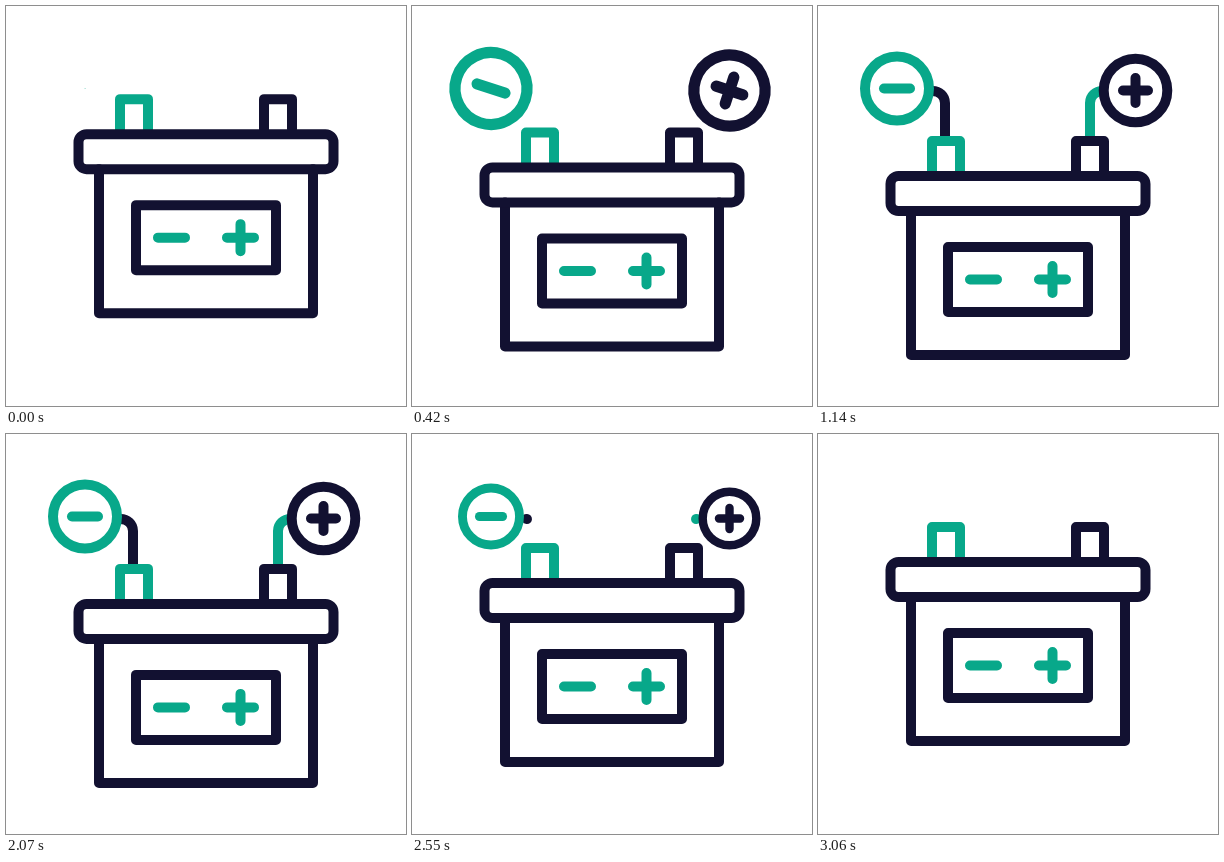
These frames come from a looping animation (400x400 px, 5.09 s). An HTML page:

```html
<!DOCTYPE html>
<html lang="en">
<head>
<meta charset="utf-8">
<title>Car battery</title>
<style>
  html, body { margin: 0; width: 100%; height: 100%; overflow: hidden; background: #fff; }
  svg { display: block; width: 100%; height: 100%; }
  .line { fill: none; stroke-width: 10; stroke-linecap: round; stroke-linejoin: round; }
  .dark { stroke: #121131; }
  .green { stroke: #08a88a; }
</style>
</head>
<body>
<svg viewBox="0 0 400 400" class="line">
  <path id="wireLeft" class="dark" pathLength="1" d="M114.5 85c7 0 12.5 5 12.5 12V131"/>
  <path id="wireRight" class="green" pathLength="1" d="M284.5 85c-7 0-12.5 5-12.5 12V131"/>
  <g id="battery">
    <path class="green" d="M114 123V93H142V123"/>
    <path class="dark" d="M258 123V93H286V123"/>
    <path class="dark" d="M93 163V307H307V163"/>
    <rect class="dark" x="72.5" y="128" width="255" height="35" rx="8"/>
    <rect class="dark" x="130" y="199" width="140" height="65"/>
    <path class="green" d="M152 231.5H179M221 231.5H248M234.5 218V245"/>
  </g>
  <g id="minus" class="green">
    <circle r="32"/>
    <path d="M-13 0H13"/>
  </g>
  <g id="plus" class="dark">
    <circle r="31.8"/>
    <path d="M-12.5 0H12.5M0-12.5V12.5"/>
  </g>
</svg>
<script>
const LOOP = 5090;
const LIFT = 42;
const el = id => document.getElementById(id);
const [battery, minus, plus, wireLeft, wireRight] =
  ['battery', 'minus', 'plus', 'wireLeft', 'wireRight'].map(el);

const span = (t, from, to) => Math.min(1, Math.max(0, (t - from) / (to - from)));
const smooth = u => u * u * (3 - 2 * u);
const out = (u, power) => 1 - Math.pow(1 - u, power);
const mix = (a, b, u) => a + (b - a) * u;

// Pop with overshoot, a small rebound, then rest.
function pop(t, peak, low) {
  if (t < 480) return peak * out(span(t, 0, 480), 4.8);
  if (t < 740) return mix(peak, low, smooth(span(t, 480, 740)));
  return low;
}

function placeBadge(node, x, y, t, delay, leave) {
  const s = t - delay;
  const settle = smooth(span(s, 740, 1040));
  const scale = mix(pop(s, 1.125, 0.99), 1, settle) * (1 - smooth(span(t, leave, leave + 470)));
  const turn = mix(pop(s, 18, -2), 0, settle);
  node.style.display = scale > 0.001 ? '' : 'none';
  node.setAttribute('transform', `translate(${x} ${y}) rotate(${turn}) scale(${scale})`);
}

function drawWire(node, length) {
  node.style.display = length > 0.001 ? '' : 'none';
  node.setAttribute('stroke-dasharray', `${length} 2`);
}

function render(t) {
  const drop = t < 1140 ? out(span(t, 0, 1600), 5.2) : 1 - smooth(span(t, 2040, 3060));
  battery.setAttribute('transform', `translate(0 ${LIFT * drop})`);

  const wire = out(span(t, 450, 1140), 2.5) * (1 - smooth(span(t, 2040, 2580)));
  drawWire(wireLeft, wire);
  drawWire(wireRight, wire);

  placeBadge(minus, 79, 82.5, t, 0, 2455);
  placeBadge(plus, 317.5, 84.5, t, 100, 2433);
}

const start = performance.now();
function tick() {
  render((performance.now() - start) % LOOP);
  requestAnimationFrame(tick);
}
render(0);
requestAnimationFrame(tick);
</script>
</body>
</html>
```
